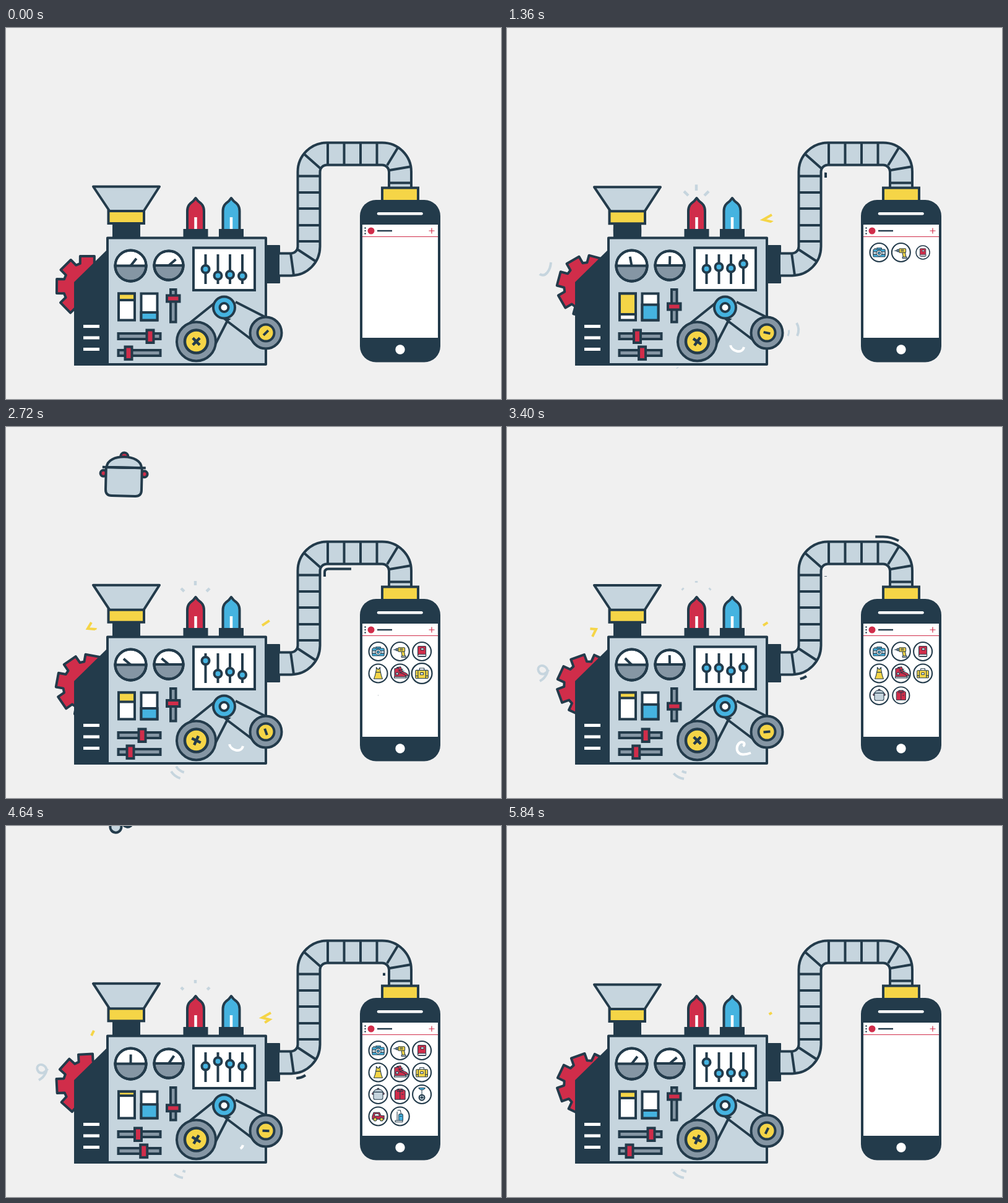
These frames come from a looping animation (800x600 px, 5.88 s). An HTML page:

```html
<!DOCTYPE html>
<html lang="en">
<head>
<meta charset="utf-8">
<title>Item machine</title>
<style>
html,body{margin:0;width:100%;height:100%;overflow:hidden;background:#f0f0f0}
svg{display:block;width:800px;height:600px;stroke:#233b4b;stroke-width:4;fill:none}
.k{fill:#233b4b}.l{fill:#c6d5de}.r{fill:#d02d4a}.b{fill:#45b3e0}
.y{fill:#f5d547}.g{fill:#8596a4}.w{fill:#fff}
.n{stroke:none}.white{stroke:#fff}
.icon{stroke-linejoin:round}
</style>
</head>
<body>
<svg id="stage" viewBox="0 0 800 600"></svg>
<script>
const LOOP = 5880, GAP = 400;
const TIMES = [0, 840, 1880, 2720, 4040, 5200, 5840, 5880];
const PALE = '#c6d5de', YELLOW = '#f5d547', WHITE = '#fff', DARK = '#233b4b';

const path = (d, c = '', x = '') => `<path d="${d}" class="${c}" ${x}/>`;
const rect = (x, y, w, h, c = '', rx = 0, more = '') =>
  `<rect x="${x}" y="${y}" width="${w}" height="${h}" rx="${rx}" class="${c}" ${more}/>`;
const circ = (x, y, r, c = '', more = '') => `<circle cx="${x}" cy="${y}" r="${r}" class="${c}" ${more}/>`;
const group = (id, s, more = '') => `<g id="${id}" ${more}>${s}</g>`;

const shoe = path('M-34 22V-30L-10 -34L4 -2C18 0 36 8 36 22Z', 'r') + rect(-36, 21, 74, 8, 'w') +
  path('M-12 -14L6 -20M-6 -3L12 -9');

// Each item sits in a box of about 76 x 72 around the origin
const items = [
  rect(-15, -28, 30, 14, 'b') + rect(-37, -19, 74, 46, 'b', 4) + rect(-37, -5, 74, 18, 'l') +
    circ(0, 4, 17, 'w') + circ(0, 4, 8, 'b') + path('M-30 -25H-20'),
  path('M8 0H26L32 32H14Z', 'y') + rect(-12, -24, 42, 25, 'y', 4) + rect(-25, -18, 13, 13, 'g') +
    path('M-40 -11H-25M-2 -16H18M-2 -9H18') + rect(9, 28, 27, 8, 'w'),
  rect(-25, -33, 50, 66, 'r', 5) + path('M-25 26Q-25 18 -17 18H25V30H-20', 'w') + rect(-6, -20, 18, 11, 'w'),
  path('M-12 -38V-22L-15 -8H15L12 -22V-38L0 -24Z', 'y') + path('M-15 -7H15Q18 14 27 34H-27Q-18 14 -15 -7Z', 'y'),
  `<g transform="translate(14 -7)">${shoe}</g>` + shoe + circ(-18, 2, 8, 'l'),
  path('M-13 -18V-30H13V-18') + rect(-36, -18, 72, 46, 'y', 4) + path('M-22 -18V28M22 -18V28') +
    rect(-8, -4, 16, 12, 'w') + path('M-36 14H-22M22 14H36'),
  circ(0, -32, 6, 'r') + circ(-33, -4, 5, 'r') + circ(33, -4, 5, 'r') +
    path('M-29 -14V22Q-29 32 -19 32H19Q29 32 29 22V-14Z', 'l') +
    path('M-28 -14C-28 -37 28 -37 28 -14Z', 'l') + path('M-35 -14H35'),
  path('M-32 -22L-12 -34H12L32 -22V32H-32Z', 'r') + path('M-12 -34L0 -18L12 -34M0 -18V32M-12 -34L-17 -18L0 -18L17 -18L12 -34') +
    path('M10 0H22'),
  circ(0, 20, 17, 'l', 'stroke-width="8"') + path('M0 -28V20') + path('M-20 -40H20Q14 -27 0 -28Q-14 -27 -20 -40Z', 'b') +
    circ(0, 20, 5, 'k') + path('M-12 20H12'),
  path('M-37 0L-28 -24H8L18 -4H37V18H-37Z', 'r') + path('M-20 -16H2L8 -2H-24Z', 'w') +
    circ(-19, 19, 10, 'y') + circ(21, 19, 10, 'y'),
  path('M-16 -38H2L8 -10') + rect(-8, -14, 26, 42, 'b', 6) + rect(-30, 26, 46, 10, 'w') + path('M-18 -30V26M-2 0H12'),
  circ(-16, -29, 8, 'y') + circ(16, -29, 8, 'y') + circ(-22, 9, 8, 'y') + circ(22, 9, 8, 'y') +
    circ(0, 14, 19, 'y') + circ(0, 16, 9, 'w') + circ(-17, 29, 9, 'l') + circ(17, 29, 9, 'l') +
    circ(0, -15, 20, 'y') + circ(0, -9, 7, 'w') + circ(-8, -19, 1.5, 'k') + circ(8, -19, 1.5, 'k')
];

// Short strokes that draw themselves and vanish: path, colour, width, start times
const marks = [
  ['M306 263V249M293 271L283 261M319 271L329 261', PALE, 4.5, []],
  ['M428 302L414 310L426 313L414 321', YELLOW, 4, [120, 576, 1250, 1824, 2400, 3050, 4028, 4500, 5182, 5822]],
  ['M138 316L132 326L144 327L138 339', YELLOW, 4, [240, 828, 1400, 2616, 3150, 3720, 4300, 4820]],
  ['M71 379C70 392 62 404 53 398C46 390 54 382 62 388C70 394 62 406 53 411', PALE, 4, [100, 900, 1300, 2740, 3200, 3880, 4440, 5040, 5430]],
  ['M275 549Q280 557 290 559', PALE, 4, [700, 1350, 2580, 3100, 4300, 5560]],
  ['M267 557Q273 567 286 569', PALE, 4, [840, 1450, 2590, 3200, 4400, 5650]],
  ['M453 482Q458 490 454 498', PALE, 3, [300, 1100, 1720, 2900, 3660, 4820]],
  ['M468 477Q474 487 469 498', PALE, 4, [400, 1200, 1900, 3000, 3880, 5040]],
  ['M371 519C376 520 386 516 383 511C378 506 370 514 372 523C375 532 386 530 394 527', WHITE, 4, [200, 1720, 3200, 3700, 4860]],
  ['M361 513C363 523 380 528 383 516', WHITE, 4, [1200, 2560, 4300]],
  ['M515 242V235Q515 229.5 521 229.5H605Q611 229.5 611 235V242', DARK, 4, [516, 1350, 2648, 3400, 4250, 5300]],
  ['M540 177.5H608Q622 178 633 184', DARK, 4, [150, 1532, 3100, 4790]],
  ['M484 403Q477 408 467 408', DARK, 4, [300, 1720, 3300, 4500]]
];
const lightDashes = ['M306 263V249', 'M293 271L283 261', 'M319 271L329 261'];
marks.splice(0, 1, ...lightDashes.map(d => [d, PALE, 4.5, [468, 1250, 2440, 3050, 3668, 4330, 5000]]));

function gearPath() {
  let d = '';
  for (let i = 0; i < 8; i++) {
    for (const [x, y] of [[-11.5, -37], [-11.5, -49], [11.5, -49], [11.5, -37]]) {
      const a = i * Math.PI / 4, c = Math.cos(a), s = Math.sin(a);
      d += `${d ? 'L' : 'M'}${x * c - y * s} ${x * s + y * c}`;
    }
  }
  return d + 'Z';
}

const bulb = (x, c) => `<g transform="translate(${x})">` +
  path('M-13.5 328V296C-13.5 286 -8 283 -4 280L0 275L4 280C8 283 13.5 286 13.5 296V328Z', c, 'stroke-linejoin="round"') +
  path('M0 306V326', 'white', 'stroke-width="4.5"') + rect(-20, 325, 40, 15, 'k n') + '</g>';

const gauge = (id, x, y, r) => circ(x, y, r, 'w') + path(`M${x} ${y}V${y - 15}`, '', `id="${id}"`) +
  path(`M${x - r} ${y}A${r} ${r} 0 0 0 ${x + r} ${y}Z`, 'g') + circ(x, y, r);

const pipe = 'M442 382.5H461A29 29 0 0 0 489.5 353.5V232.5A29 29 0 0 1 519 203.5H608A29 29 0 0 1 637 232.5V260';
const ribs = 'M460 364L465 400M471 358L500 377M472 345H507M472 319H507M472 292H507M472 266H507M472 239.5H507' +
  'M482 204L508 227M520 186V221M546.5 186V221M573 186V221M599.5 186V221M633 194L616 222M655 224L620 230M619 250.5H655';

const machine =
  path(gearPath(), 'r', 'id="gear" stroke-linejoin="round"') +
  path('M110 411L164 358V546H110Z', 'k n') +
  path('', 'k n', 'id="neck"') + path('', 'l', 'id="cone" stroke-linejoin="round"') +
  rect(165.5, 296, 57.5, 20, 'y', 0, 'id="collar"') +
  rect(164, 339.5, 256, 204.5, 'l', 0, 'stroke-linejoin="round"') + path('M111 544H164') +
  path('M125 482.5H151M125 501H151M125 519.5H151', 'white', 'stroke-width="5"') +
  bulb(306.5, 'r') + bulb(364, 'b') +
  gauge('needle0', 201.5, 384.5, 25) + gauge('needle1', 263, 384, 23.5) +
  rect(303, 355.5, 99, 68.5, 'w') + path('M322.5 366V414M342.5 366V414M362 366V414M382 366V414') +
  [322.5, 342.5, 362, 382].map((x, i) => circ(x, 0, 6, 'b', `id="knob${i}"`)).join('') +
  rect(182, 429.5, 26, 43, 'w') + rect(182, 429.5, 26, 10, 'y', 0, 'id="yellowFill"') +
  rect(218.5, 429.5, 26, 43, 'w') + rect(218.5, 460, 26, 10, 'b', 0, 'id="blueFill"') +
  rect(266, 423, 8.5, 52.5, 'g') + rect(260, -5, 20.5, 10, 'r', 0, 'id="lever"') +
  [498.5, 525.5].map((y, i) => rect(181.5, y - 4.5, 68, 9, 'g') +
    rect(-5.5, y - 10, 11, 20.5, 'r', 0, `id="slide${i}"`)).join('') +
  path('M297 477L338 444M338 512L358 473M371 443L418 467M356 473L397 504') + path('M350 470H364L357 476Z', 'k n') +
  circ(307.5, 507, 31.5, 'g') + circ(307.5, 507, 18.5, 'y', 'stroke-width="4.5"') +
  path('M-8 0H8M0 -8V8', '', 'id="cross" stroke-width="4.5"') +
  circ(420, 493, 25.5, 'g') + circ(420, 493, 13.5, 'y') + path('M0 -5.5V5.5', '', 'id="slash"') +
  circ(352.5, 452, 17.5, 'b') + circ(352.5, 452, 7, 'w') +
  rect(420, 351, 23, 62, 'k n', 1);

const phone =
  path(pipe, '', 'stroke-width="40"') + path(pipe, '', `stroke-width="32" style="stroke:${PALE}"`) + path(ribs) +
  rect(608, 258.5, 58, 24, 'y') + rect(572, 278, 130, 262.5, 'k n', 26) +
  path('M602 300.3H671.5', 'white', 'stroke-width="4.5" stroke-linecap="round"') +
  rect(576, 318, 122, 183, 'w n') + circ(637, 520, 7.7, 'w n') +
  [323.5, 328, 332.5].map(y => circ(580.5, y, 1.2, 'k n')).join('') +
  circ(590, 328, 5.5, 'r n') + path('M600 328H624', '', 'stroke-width="2.4"') +
  path('M576 337.5H698M683.5 328H692.5M688 323.5V332.5', '', 'stroke-width="1.2" style="stroke:#d02d4a"') +
  group('list', items.map((s, i) => group('slot' + i,
    circ(0, 0, 15, 'w', 'stroke-width="2.1"') + `<g transform="scale(.26)">${s}</g>`)).join(''), 'class="icon"');

stage.innerHTML =
  '<clipPath id="above"><path d="M0 0H800V264H0Z"/></clipPath>' +
  '<clipPath id="screen"><path d="M576 338H698V501H576Z"/></clipPath>' +
  `<g clip-path="url(#above)">${items.map((s, i) => group('drop' + i, s, 'class="icon"')).join('')}</g>` +
  machine + phone.replace('<g id="list"', '<g clip-path="url(#screen)"><g id="list"') + '</g>' +
  marks.map(([d, c, w], i) => path(d, '', `id="mark${i}" pathLength="100" style="stroke:${c};stroke-width:${w}"`)).join('');

const el = {};
stage.querySelectorAll('[id]').forEach(e => el[e.id] = e);
const set = (id, name, v) => el[id].setAttribute(name, v);
const move = (id, v) => set(id, 'transform', v);
const show = (id, on) => el[id].style.display = on ? '' : 'none';
const clamp = v => Math.max(0, Math.min(1, v));

function at(t, ts, vs) {
  let i = 0;
  while (i < ts.length - 2 && t > ts[i + 1]) i++;
  return vs[i] + (vs[i + 1] - vs[i]) * clamp((t - ts[i]) / (ts[i + 1] - ts[i]));
}
const pose = (t, ...vs) => at(t, TIMES, [...vs, vs[0]]);
const turn = (t, ...vs) => at(t, TIMES, vs);

function draw(now) {
  const t = now % LOOP;

  move('gear', `translate(131 418) rotate(${turn(t, 0, 370, 829, 1180, 1732, 2205, 2455, 2475)})`);
  move('cross', `translate(307.5 507) rotate(${turn(t, 45, 385, 765, 1105, 1665, 2160, 2455, 2475)})`);
  move('slash', `translate(420 493) rotate(${turn(t, 45, 390, 892, 1240, 1792, 2332, 2545, 2565)})`);

  move('needle0', `rotate(${pose(t, 38, 12, -33, -50, -42, 40, 38)} 201.5 384.5)`);
  move('needle1', `rotate(${pose(t, 50, -48, 50, -50, 45, 25, 50)} 263 384)`);
  set('knob0', 'cy', pose(t, 390, 401, 378, 378, 401, 377, 382));
  set('knob1', 'cy', pose(t, 400.5, 396, 377, 399, 381, 380, 400));
  set('knob2', 'cy', pose(t, 399, 400, 377, 396, 393, 377, 399));
  set('knob3', 'cy', pose(t, 401, 378, 385, 401, 377, 399, 401));
  set('yellowFill', 'height', pose(t, 10.5, 31, 36, 15, 3, 10, 10.5));
  const top = pose(t, 460, 441, 454, 455, 443, 457, 460);
  set('blueFill', 'y', top);
  set('blueFill', 'height', 472.5 - top);
  move('lever', `translate(0 ${pose(t, 437.5, 440.5, 460.5, 447, 456, 456.5, 437.5)})`);
  move('slide0', `translate(${pose(t, 233, 222, 199, 220, 228, 200, 233)})`);
  move('slide1', `translate(${pose(t, 198, 204, 233, 201, 216, 229, 198)})`);

  // The hopper dips at each landing and springs back
  const beat = t < 420 || t > 5220 ? 400 : (t - 420) % GAP;
  const dip = at(beat, [0, 20, 60, 160, 240, 300, 380, 400], [0, 5, 4, 0, -2.2, -.8, .3, 0]);
  const low = .4 * dip, bulge = 2 * Math.max(0, low);
  set('cone', 'd', `M141 ${256.5 + dip}H248L222 ${297 + low}H168Z`);
  set('collar', 'y', 296 + low);
  set('neck', 'd', `M172 316Q${172 - bulge} 328 172 340H217Q${217 + bulge} 328 217 316Z`);

  items.forEach((_, i) => {
    const land = GAP * (i + 1);
    const u = t - land - 20;
    show('drop' + i, u > -230 && u < 20);
    const y = 255 + 2 * u + .0023 * u * u;
    const tilt = Math.max(0, -u - 97) * .65;
    const squeeze = at(u, [-30, 15], [1, .5]);
    move('drop' + i, `translate(${i === 4 ? 184 : 190.5} ${y}) rotate(${tilt}) scale(${squeeze})`);

    const age = t - land + 120;
    show('slot' + i, age >= 0);
    const size = at(age, [0, 40, 160, 330, 430, 600], [.03, .04, .2, .95, 1.1, 1]);
    move('slot' + i, `translate(${601.5 + i % 3 * 35.3} ${363 + Math.floor(i / 3) * 35.5}) scale(${size})`);
  });
  move('list', `translate(0 ${-2 * Math.pow(Math.max(0, t - 5120) / 80, 2.5)})`);

  marks.forEach(([, , , starts], i) => {
    const start = starts.find(s => t >= s && t < s + GAP);
    show('mark' + i, start !== undefined);
    if (start === undefined) return;
    const p = (t - start) / GAP;
    const head = 100 * clamp(p * 2.5), tail = 100 * clamp((p - .4) / .6);
    set('mark' + i, 'stroke-dasharray', `0 ${tail} ${head - tail} 200`);
  });
}

function tick() {
  draw(performance.now());
  requestAnimationFrame(tick);
}
tick();
</script>
</body>
</html>
```
